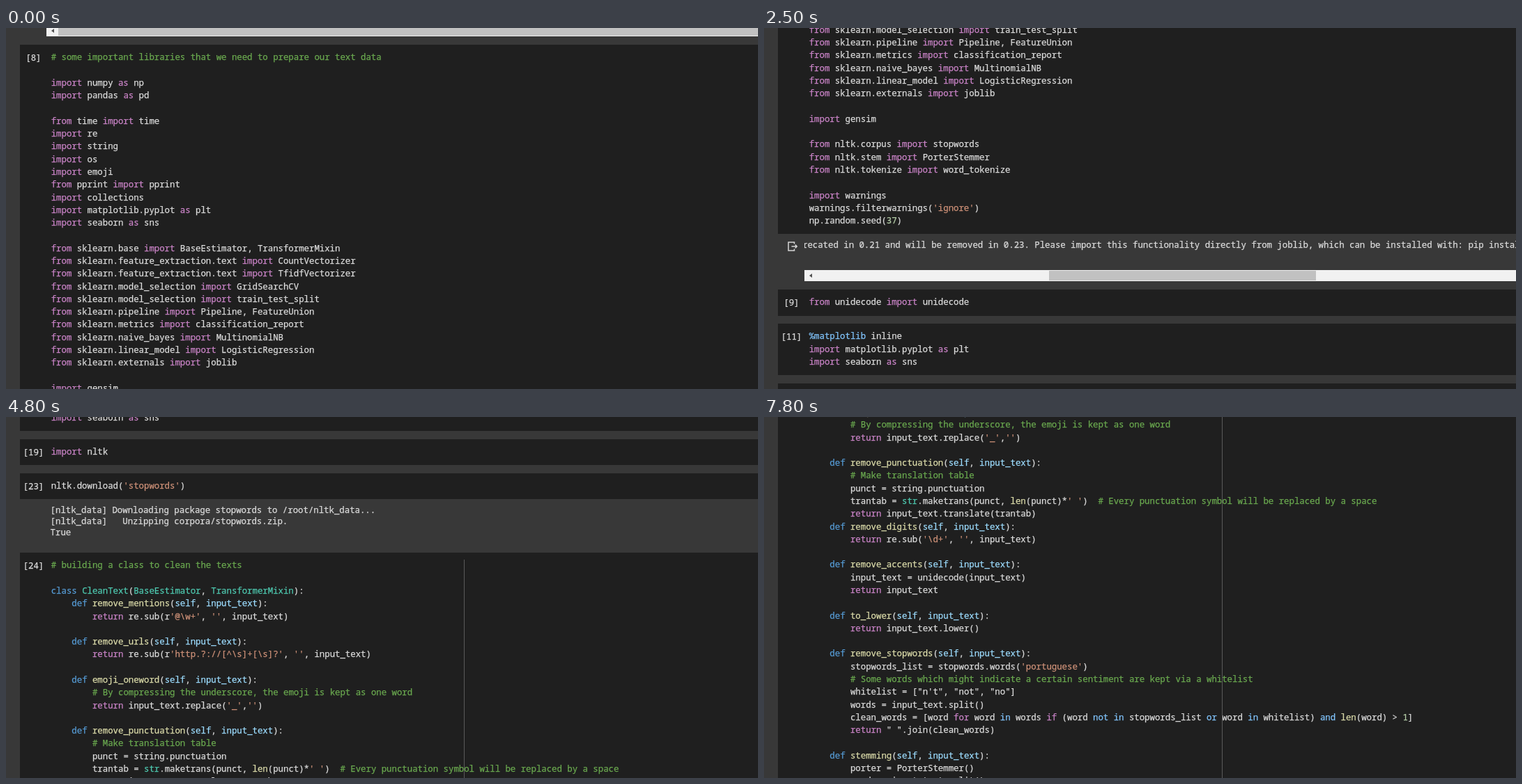
These frames come from a looping animation (1079 by 519 pixels, 8000 ms). An HTML page:

```html
<!DOCTYPE html>
<html lang="en">
<head>
<meta charset="utf-8">
<title>Notebook scroll</title>
<style>
  html, body { margin: 0; width: 100%; height: 100%; overflow: hidden; background: #383838; }
  svg { display: block; width: 1079px; height: 519px; }
  text { font: 12.35px "Noto Sans Mono", "DejaVu Sans Mono", monospace; color: #dcdcdc; }
  text, tspan { fill: currentColor; stroke: currentColor; stroke-width: .25px; }
</style>
</head>
<body>
<svg viewBox="0 0 1079 519"><g id="page"></g></svg>
<script>
const CHAR = 7.41, LINE = 18.286, LEFT = 64.7, WHEEL = 96.22, LOOP = 8000;

const COLOR = {
  comment: '#6aa94f', string: '#ce9178', key: '#cb84c8', def: '#569cd6', type: '#4ec9b0',
  fn: '#dcdcaa', param: '#9cdcfe', op: '#82c6ff', num: '#b5cea8'
};
const WORDS = {
  import: 'key', from: 'key', as: 'key', return: 'key', for: 'key', if: 'key',
  in: 'op', or: 'op', not: 'op', and: 'op', def: 'def', class: 'def', str: 'type', len: 'fn'
};

const IMPORTS = `# some important libraries that we need to prepare our text data

import numpy as np
import pandas as pd

from time import time
import re
import string
import os
import emoji
from pprint import pprint
import collections
import matplotlib.pyplot as plt
import seaborn as sns

from sklearn.base import BaseEstimator, TransformerMixin
from sklearn.feature_extraction.text import CountVectorizer
from sklearn.feature_extraction.text import TfidfVectorizer
from sklearn.model_selection import GridSearchCV
from sklearn.model_selection import train_test_split
from sklearn.pipeline import Pipeline, FeatureUnion
from sklearn.metrics import classification_report
from sklearn.naive_bayes import MultinomialNB
from sklearn.linear_model import LogisticRegression
from sklearn.externals import joblib

import gensim

from nltk.corpus import stopwords
from nltk.stem import PorterStemmer
from nltk.tokenize import word_tokenize

import warnings
warnings.filterwarnings('ignore')
np.random.seed(37)`;

const CLEANER = String.raw`# building a class to clean the texts

class CleanText(BaseEstimator, TransformerMixin):
    def remove_mentions(self, input_text):
        return re.sub(r'@\w+', '', input_text)

    def remove_urls(self, input_text):
        return re.sub(r'http.?://[^\s]+[\s]?', '', input_text)

    def emoji_oneword(self, input_text):
        # By compressing the underscore, the emoji is kept as one word
        return input_text.replace('_','')

    def remove_punctuation(self, input_text):
        # Make translation table
        punct = string.punctuation
        trantab = str.maketrans(punct, len(punct)*' ')  # Every punctuation symbol will be replaced by a space
        return input_text.translate(trantab)
    def remove_digits(self, input_text):
        return re.sub('\d+', '', input_text)

    def remove_accents(self, input_text):
        input_text = unidecode(input_text)
        return input_text

    def to_lower(self, input_text):
        return input_text.lower()

    def remove_stopwords(self, input_text):
        stopwords_list = stopwords.words('portuguese')
        # Some words which might indicate a certain sentiment are kept via a whitelist
        whitelist = ["n't", "not", "no"]
        words = input_text.split()
        clean_words = [word for word in words if (word not in stopwords_list or word in whitelist) and len(word) > 1]
        return " ".join(clean_words)

    def stemming(self, input_text):
        porter = PorterStemmer()
        words = input_text.split()`;

const page = document.getElementById('page');

function add(tag, attrs, parent = page, text) {
  const el = document.createElementNS('http://www.w3.org/2000/svg', tag);
  for (const k in attrs) el.setAttribute(k, attrs[k]);
  if (text !== undefined) el.textContent = text.replace(/ /g, '\u00a0');
  return parent.appendChild(el);
}
const rect = (x, y, width, height, fill) => add('rect', { x, y, width, height, fill });
const label = (x, y, text) => add('text', { x, y: Math.round(y) }, page, text);

// Splits a line of Python into [text, colour kind] pairs.
function tokens(line) {
  const head = line.trim().split(' ')[0];
  let seen = 0;
  return line.trim().match(/#.*|'[^']*'|"[^"]*"|%\w+|\w+|[^\w'"#%]+/g).map(s => {
    if (s[0] === '#') return [s, 'comment'];
    if (s[0] === "'") return [s, 'string'];
    if (s[0] === '%') return [s, 'op'];
    if (/^\d+$/.test(s)) return [s, 'num'];
    if (!/^\w/.test(s)) return [s];
    if (WORDS[s]) return [s, WORDS[s]];
    if (head === 'def') return [s, seen++ ? 'param' : 'fn'];
    if (head === 'class') return [s, 'type'];
    return [s];
  });
}

function code(source, y) {
  source.split('\n').forEach((line, i) => {
    if (!line) return;
    const el = add('text', { x: LEFT + line.search(/\S/) * CHAR, y: Math.round(y + i * LINE) });
    for (const [s, kind] of tokens(line)) add('tspan', kind ? { color: COLOR[kind] } : {}, el, s);
  });
}

function cell(n, top, height, source) {
  rect(20, top, 1059, height, '#1f1f1f');
  code(source, top + 22.4);
  const tag = `[${n}]`;
  return label(39.4 - tag.length * CHAR / 2, top + 22.6, tag);
}

function scrollbar(y, thumbX, thumbW) {
  rect(58, y, 1021, 16, '#f1f1f1');
  rect(thumbX, y + 1, thumbW, 14, '#c1c1c1');
  add('path', { d: `M69 ${y + 5}v6l-4 -3z`, fill: '#505050' });
}

scrollbar(-4, 75, 1004);
const count = cell(8, 24, 659, IMPORTS);

const run = add('g', {});
add('circle', { cx: 39, cy: 43, r: 10, fill: '#d5d5d5' }, run);
add('path', { d: 'M36 38.5v9l7 -4.5z', fill: '#1f1f1f' }, run);

label(55, 702.6, 'recated in 0.21 and will be removed in 0.23. Please import this functionality ' +
  'directly from joblib, which can be installed with: pip install joblib.');
rect(20, 688, 38, 24, '#383838');
add('path', {
  d: 'M43.5 697.5v-2.5h-8.5v12h8.5v-2.5M39.5 701h7.5M44.8 698.6l2.4 2.4l-2.4 2.4',
  fill: 'none', stroke: '#d5d5d5', 'stroke-width': 1.5
});
scrollbar(735, 409, 383);

cell(9, 763, 38, 'from unidecode import unidecode');
cell(11, 812, 74, '%matplotlib inline\nimport matplotlib.pyplot as plt\nimport seaborn as sns');
cell(19, 898, 37, 'import nltk');
cell(23, 947, 37, "nltk.download('stopwords')");
['[nltk_data] Downloading package stopwords to /root/nltk_data...',
 '[nltk_data]   Unzipping corpora/stopwords.zip.',
 'True'].forEach((s, i) => label(63.6, 1004 + i * 16.2, s));
cell(24, 1061, 800, CLEANER);
rect(657, 1071, 1, 790, '#5a5a5a');

// Wheel scrolls: start, notches, duration.
const SCROLLS = [
  [880, 1, 180], [1480, 1, 180], [1985, 2, 300], [2488, 2, 190], [3988, 2, 300],
  [4580, 1, 180], [5380, 1, 180], [6080, 1, 180], [6780, 1, 180], [7580, 1, 180]
];
const ease = p => p * p * (3 - 2 * p);

function draw(now) {
  const t = Math.floor(now % LOOP / 100) * 100;
  const notches = SCROLLS.reduce((sum, [start, n, dur]) =>
    sum + n * ease(Math.min(1, Math.max(0, (t - start) / dur))), 0);
  page.setAttribute('transform', `translate(0 ${-Math.round(notches * WHEEL)})`);

  const hover = t >= 200 && t < 400;
  run.setAttribute('opacity', hover ? (t < 300 ? 0.8 : 1) : 0);
  count.setAttribute('opacity', hover ? 0 : 1);
}

function tick(now) {
  draw(now);
  requestAnimationFrame(tick);
}
draw(0);
requestAnimationFrame(tick);
</script>
</body>
</html>
```
